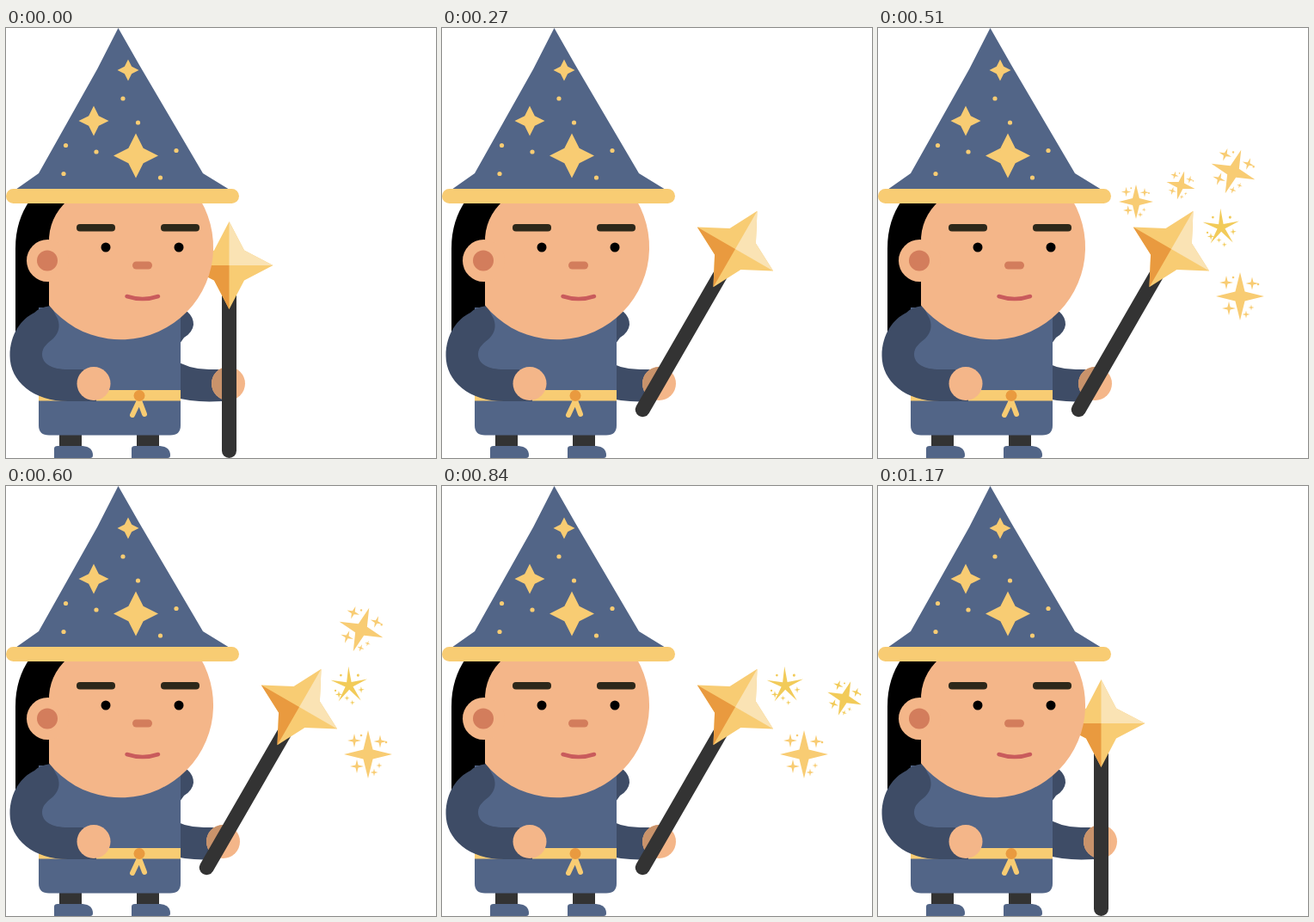
Recreate the animation shown at these times as an HTML page. Size 500 by 500 pixels, loop 1200 ms.

```html
<!DOCTYPE html>
<html lang="en">
<head>
<meta charset="utf-8">
<title>Wizard</title>
<style>
  html, body { margin: 0; height: 100%; overflow: hidden; background: #fff; }
  svg { display: block; width: 100vw; height: 100vh; }
  .blue { fill: #526587; }
  .sleeve { fill: #3e4c66; }
  .skin { fill: #f4b689; }
  .blush { fill: #d37d5c; }
  .gold { fill: #f8cc73; }
  .lemon { fill: #f2cb59; }
  .dark { fill: #333; }
  .brow { fill: #2d281a; }
</style>
</head>
<body>
<svg viewBox="0 0 500 500">
  <g id="hand">
    <path class="sleeve" d="M195 385Q212 397 236 397H251V434Q217 436 195 429Z"/>
    <circle class="skin" cx="258.5" cy="413.5" r="19.5"/>
    <path id="shade" fill="#c9936b" d="M0 -19.5A19.5 19.5 0 0 0 0 19.5Z"/>
  </g>
  <g id="wand">
    <rect class="dark" x="-8.5" y="20" width="17" height="204" rx="8.5"/>
    <path class="gold" d="M0 -51L17.5 -17.5L51 0L17.5 17.5L0 51L-17.5 17.5L-51 0L-17.5 -17.5Z"/>
    <path fill="#fae3b4" d="M0 0V-51L17.5 -17.5L51 0Z"/>
    <path fill="#e99a3f" d="M0 0V51L-17.5 17.5L-51 0Z"/>
  </g>

  <path d="M28 200Q11 224 11 256V356H60L76 200Z"/>
  <path class="sleeve" d="M200 330H211Q218 336 218 345Q217 354 207 360L202 367Z"/>
  <g id="legs"></g>
  <path class="blue" d="M38 325H203V462Q203 473.5 191 473.5H50Q38 473.5 38 462Z"/>
  <path class="gold" d="M38 421H203V433.5H38Z"/>
  <path d="M155 433L147 450M155 433L161 449" fill="none" stroke="#f8cc73" stroke-width="6" stroke-linecap="round"/>
  <circle cx="155" cy="427.5" r="6.5" fill="#e99a3f"/>
  <path class="sleeve" d="M52 323Q38 325 33 331C18 338 4.5 356 4.5 381C4.5 411 32 434 72 434H105V397H72C54 397 42 391 42 379C42 371 49 366 55 361C62 354 63 346 60 338Z"/>
  <circle class="skin" cx="102" cy="413.5" r="19.5"/>

  <path class="skin" d="M50 322.5V250Q49 221 72 200H226A107.5 107.5 0 0 1 50 322.5Z"/>
  <circle class="skin" cx="48.5" cy="270.5" r="24.5"/>
  <circle class="blush" cx="48" cy="270.5" r="12"/>
  <rect class="brow" x="82" y="228" width="45" height="8.5" rx="4"/>
  <rect class="brow" x="180" y="228" width="45" height="8.5" rx="4"/>
  <circle cx="116" cy="255" r="5.5"/>
  <circle cx="201" cy="255" r="5.5"/>
  <rect class="blush" x="147" y="271.5" width="23" height="9" rx="4.5"/>
  <path d="M140.5 312Q159 318 177 312" fill="none" stroke="#c95b5c" stroke-width="4.5" stroke-linecap="round"/>

  <path class="blue" d="M130.5 0L106 48L38 169L11 188H260L229 169L155 43Z"/>
  <rect class="gold" y="187" width="271" height="17" rx="8.5"/>
  <g id="hatStars" class="gold"></g>
  <g id="sparkles"></g>
</svg>
<script>
const LOOP = 1200;
const byId = id => document.getElementById(id);

function star(x, y, r, tips, inner) {
  const points = Array.from({ length: tips * 2 }, (_, i) => {
    const a = i * Math.PI / tips, d = i % 2 ? r * inner : r;
    return `${(x + d * Math.sin(a)).toFixed(2)},${(y - d * Math.cos(a)).toFixed(2)}`;
  });
  return `<polygon points="${points.join(' ')}"/>`;
}

const glint = (x, y, r) => star(x, y, r, 4, .28);
const dot = (x, y, r) => `<circle cx="${x}" cy="${y}" r="${r}"/>`;

byId('legs').innerHTML = [56, 146].map(x =>
  `<path class="dark" d="M${x + 6} 470h26v18h-26z"/>
   <path class="blue" d="M${x} 500v-11q0 -3 4 -3h29q12 1 12 11q0 3 -3 3z"/>`).join('');

byId('hatStars').innerHTML =
  [[142, 49, 12.5], [102, 108, 17.5], [151, 148.5, 26]].map(s => star(...s, 4, .47)).join('') +
  [[136, 82], [153.5, 110], [69.5, 136.5], [105, 144], [67, 169.5], [198, 142.5], [179.5, 174]]
    .map(p => dot(...p, 2.6)).join('');

// Sparkle shapes drawn at radius 28
const burst = {
  4: glint(0, 0, 28) + glint(-16, -16, 8) + glint(14, -15, 7.5) + glint(-13, 14, 8) +
     glint(7, 21, 4.5) + glint(13, 13, 3.5) + dot(-8, -22, 1.3) + dot(21, -14, 1.3),
  5: star(0, 0, 29, 5, .21) + glint(-16, 13, 5.5) + glint(-4, 19, 4) + glint(18, 7, 5) +
     glint(4, 26, 4) + dot(-12, -16, 1.8) + dot(14, -15, 2) + dot(-21, 7, 1.5)
};

const sparkles = [
  { x: 300, y: 202, r: 20, turn: 0, tips: 4, color: 'gold', from: 300, to: 600 },
  { x: 352, y: 183, r: 17, turn: 14, tips: 4, color: 'gold', from: 360, to: 600 },
  { x: 413, y: 167, r: 27, turn: 20, tips: 4, color: 'gold', from: 420, to: 660 },
  { x: 399, y: 232, r: 21.5, turn: -2, tips: 5, color: 'lemon', from: 510, to: 870 },
  { x: 421, y: 312, r: 28, turn: 0, tips: 4, color: 'gold', from: 510, to: 1050 },
  { x: 316.5, y: 126, r: 28, turn: 0, tips: 5, color: 'lemon', from: 660, to: 840 },
  { x: 468, y: 247, r: 21, turn: 20, tips: 4, color: 'lemon', from: 720, to: 960 }
];
byId('sparkles').innerHTML = sparkles.map(s =>
  `<g class="${s.color}" transform="translate(${s.x} ${s.y}) rotate(${s.turn}) scale(${s.r / 28})">${burst[s.tips]}</g>`).join('');
const sparkleNodes = [...byId('sparkles').children];

function draw(t) {
  const raised = t >= 270 && t < 1170;
  const angle = raised ? 30 : 0;
  byId('wand').setAttribute('transform', `translate(${raised ? '341 257' : '259.5 276'}) rotate(${angle})`);
  byId('hand').setAttribute('transform', `translate(${raised ? -6 : 0} 0)`);
  byId('shade').setAttribute('transform', `translate(258.5 413.5) rotate(${angle})`);
  sparkles.forEach((s, i) => {
    sparkleNodes[i].style.display = t >= s.from && t < s.to ? '' : 'none';
  });
}

const start = performance.now();
function tick() {
  draw((performance.now() - start) % LOOP);
  requestAnimationFrame(tick);
}
tick();
</script>
</body>
</html>
```
